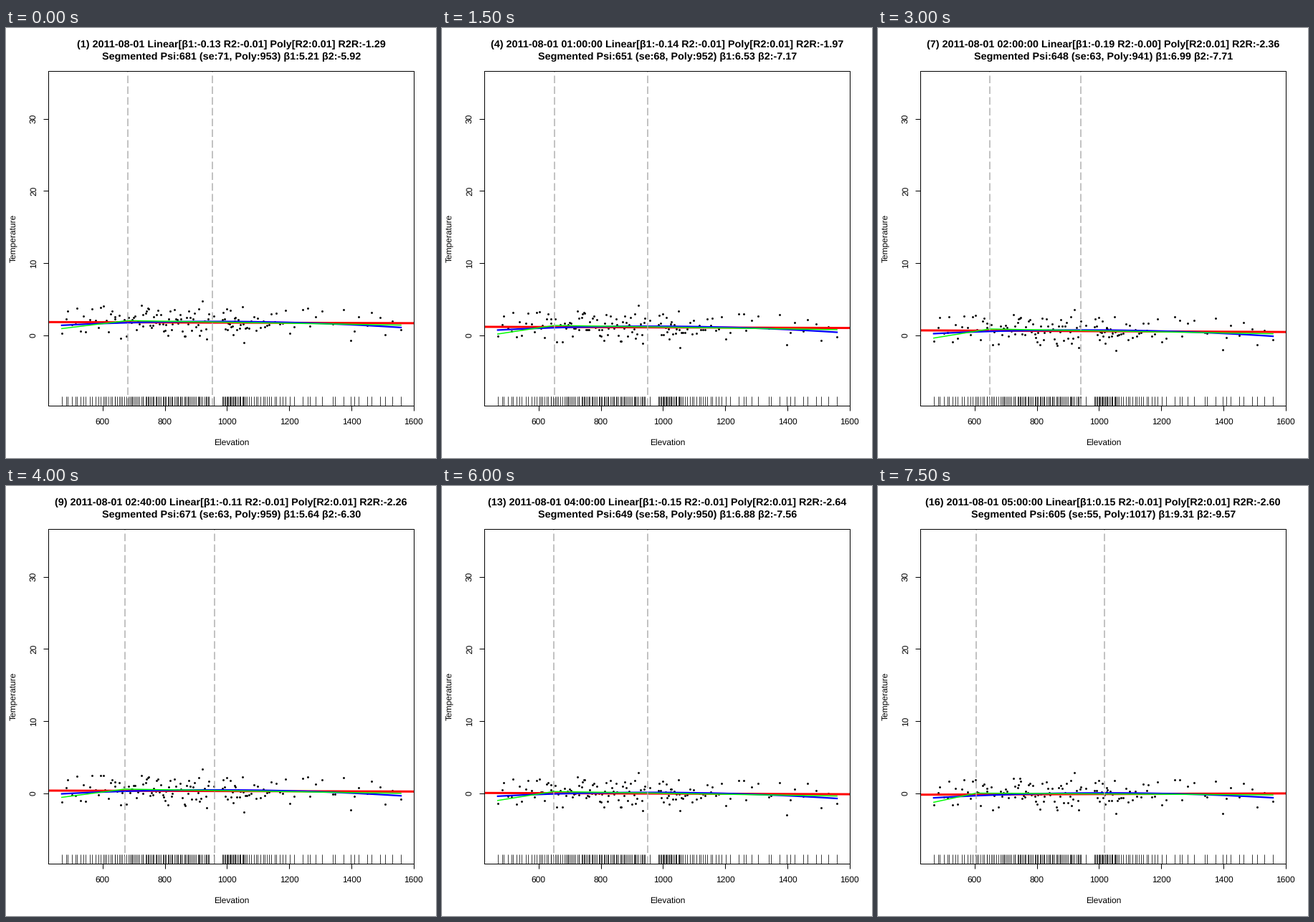
A matplotlib script that plays this animation: 600 by 600 pixels, repeating every 8000 ms.

```python
import matplotlib.pyplot as plt
import numpy as np
from matplotlib.animation import FuncAnimation

STAGE = 600
PX = 0.72  # points per pixel at 100 dpi
STEPS = 16
STATIONS = 150
LEFT, RIGHT, TOP, BOTTOM = 59.04, 569.4, 59.6, 526.56
XLIM, YLIM = (425.8, 1601.2), (-9.72, 36.66)
CURVATURE = 2.25e-6

plt.rcParams.update({
    "font.family": "Liberation Sans",
    "text.hinting": "no_hinting",
    "lines.dash_capstyle": "butt",
    "lines.scale_dashes": False,
})

# key points: step, slope, R2R, psi, se, poly vertex, beta1, beta2
KEYS = np.array([
    (1, -0.13, -1.29, 681, 71, 953, 5.21, -5.92),
    (2, -0.05, -2.15, 649, 67, 973, 7.02, -7.60),
    (5, -0.18, -1.88, 652, 69, 941, 6.28, -6.96),
    (7, -0.19, -2.36, 648, 63, 941, 6.99, -7.71),
    (9, -0.11, -2.26, 671, 63, 959, 5.64, -6.30),
    (13, -0.15, -2.64, 649, 58, 950, 6.88, -7.56),
    (16, 0.15, -2.60, 605, 55, 1017, 9.31, -9.57),
])


def make_stations(rng):
    """Elevations, dense between 640 and 1060, and offsets from the trend."""
    share = (np.arange(STATIONS) + rng.uniform(-0.5, 0.5, STATIONS)) / STATIONS
    elev = np.interp(share, [0, 0.08, 0.19, 0.59, 0.60, 0.76, 0.87, 1],
                     [469, 590, 686, 946, 985, 1061, 1188, 1559])
    elev[-1] = 1559
    offset = rng.normal(0.1, 1.0, STATIONS).clip(-1.9, 1.9)
    offset[[0, -1]] = -1.4, -1.1
    extremes = [(603, 2.2), (658, -2.1), (725, 2.3), (922, 2.8), (935, -2.1),
                (1049, 2.1), (1055, -2.8), (1243, 1.9), (1397, -2.3)]
    for x, rise in extremes:
        i = np.abs(elev - x).argmin()
        elev[i], offset[i] = x, rise
    return elev, offset


rng = np.random.default_rng(8)
elev, offset = make_stations(rng)
drift = rng.normal(0, 0.05, (STEPS, STATIONS)).cumsum(axis=0)
drift += rng.normal(0, 0.1, drift.shape)
center = elev.mean()
grid = np.linspace(elev.min(), elev.max(), 120)


def through_mean(curve, mean):
    """Shift a curve so that it averages to the mean over the stations."""
    return curve(grid) - curve(elev).mean() + mean


fig = plt.figure(figsize=(6, 6), dpi=100, facecolor="white")
ax = fig.add_axes([LEFT / STAGE, 1 - BOTTOM / STAGE,
                   (RIGHT - LEFT) / STAGE, (BOTTOM - TOP) / STAGE])
ax.set(xlim=XLIM, ylim=YLIM,
       xticks=range(600, 1601, 200), yticks=range(0, 31, 10))
ax.tick_params(length=7.2 * PX, width=PX, labelbottom=False, labelleft=False)
for spine in ax.spines.values():
    spine.set_linewidth(PX)


def label(x, y, text="", size=12, **kw):
    return fig.text(x / STAGE, 1 - y / STAGE, text, fontsize=size * PX,
                    ha="center", va="baseline", rotation_mode="anchor", **kw)


def line(color, width, **kw):
    return ax.plot([], [], color=color, lw=width * PX, **kw)[0]


mid_x, mid_y = (LEFT + RIGHT) / 2, (TOP + BOTTOM) / 2
for value in ax.get_xticks():
    x = np.interp(value, XLIM, (LEFT, RIGHT))
    label(x, 552.4, f"{value:.0f}")
for value in ax.get_yticks():
    y = np.interp(value, YLIM, (BOTTOM, TOP))
    label(41.8, y, f"{value:.0f}", rotation=90)
label(mid_x, 581.6, "Elevation")
label(13, mid_y, "Temperature", rotation=90)
titles = [label(mid_x, y, size=14.4, weight="bold") for y in (26.9, 44.1)]

ax.vlines(elev, YLIM[0], -8.52, color="black", lw=0.75 * PX)
dots = line("black", 0, marker="o", ms=2.9 * PX, mew=0, ls="none")
red = line("#ff0000", 3)
blue = line("#0000ff", 2.25)
green = line("#00ff00", 1.5)
breaks = [line("#b0b0b0", 1.5, dashes=(10.5 * PX, 4.5 * PX)) for _ in range(2)]


def draw(i):
    step = i + 1
    slope, r2r, psi, se, vertex, b1, b2 = (
        np.interp(step, KEYS[:, 0], col) for col in KEYS.T[1:])
    mean = 1.89 * (1 - i / 15.5) ** 2 - 0.13  # night cooling levels off
    r2 = 0.2 * slope ** 2 - 0.01

    def linear(x):
        return mean + slope * (x - center) / 1000

    def segmented(x):
        return (b1 * x + b2 * np.maximum(x - psi, 0)) / 1000

    def poly(x):
        return -CURVATURE * (x - vertex) ** 2

    hours, minutes = divmod(20 * i, 60)
    clock = f" {hours:02d}:{minutes:02d}:00" if i else ""
    titles[0].set_text(f"({step}) 2011-08-01{clock} Linear[β1:{slope:.2f} "
                       f"R2:{r2:.2f}] Poly[R2:0.01] R2R:{r2r:.2f}")
    titles[1].set_text(f"Segmented Psi:{psi:.0f} (se:{se:.0f}, "
                       f"Poly:{vertex:.0f}) β1:{b1:.2f} β2:{b2:.2f}")

    dots.set_data(elev, linear(elev) + offset + drift[i])
    red.set_data(XLIM, [linear(x) for x in XLIM])
    blue.set_data(grid, through_mean(poly, mean))
    green.set_data(grid, through_mean(segmented, mean))
    for mark, x in zip(breaks, (psi, vertex)):
        mark.set_data([x, x], YLIM)
    return [*titles, dots, red, blue, green, *breaks]


anim = FuncAnimation(fig, draw, frames=STEPS, interval=500,
                     repeat=True, repeat_delay=0, blit=False)
plt.show()
```
